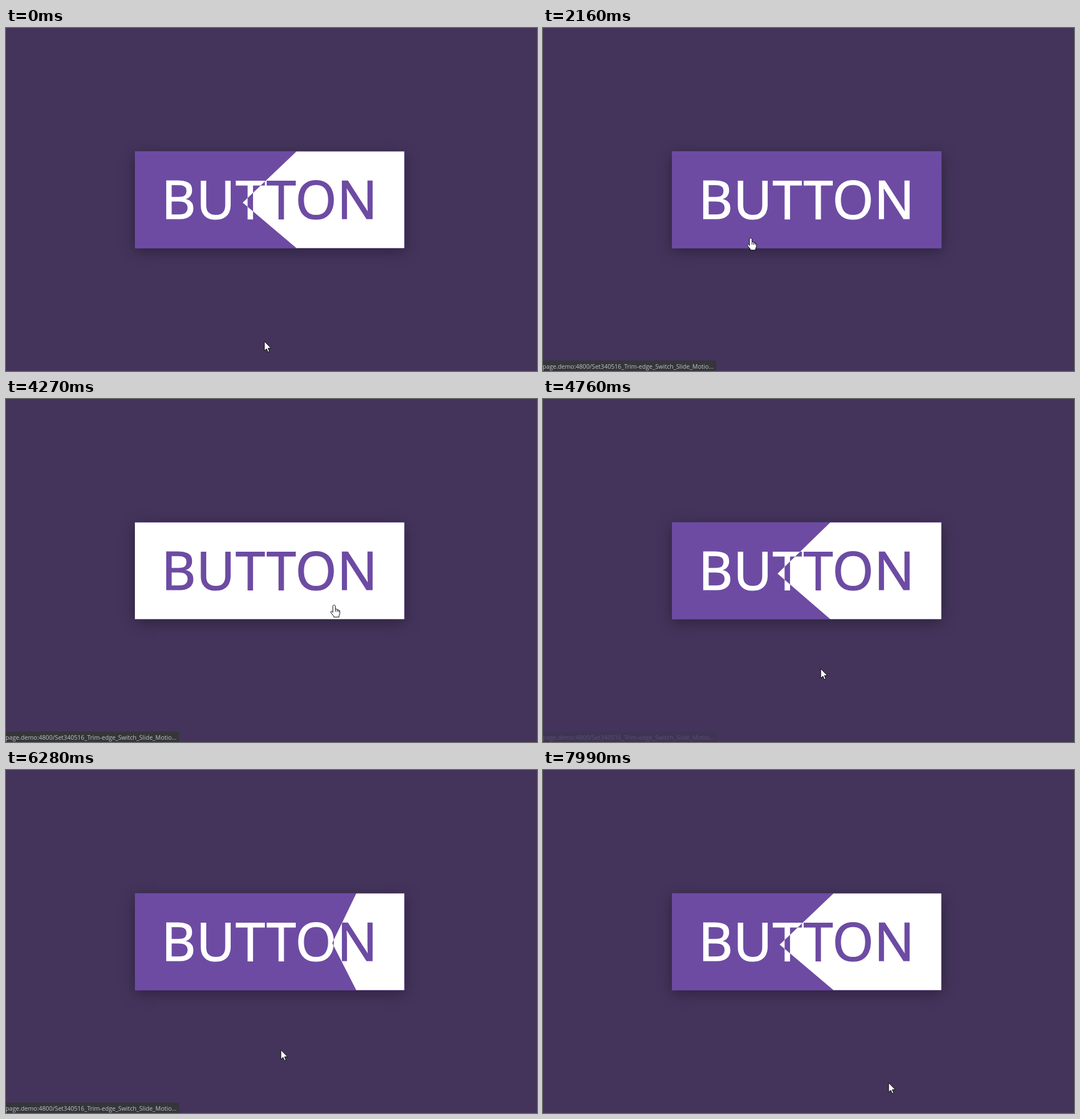
An HTML page with a canvas that plays this animation: 931 by 602 pixels, repeating every 8.37 s.

```html
<!DOCTYPE html>
<html lang="en">
<head>
<meta charset="utf-8">
<title>Button hover</title>
<style>
html, body { margin: 0; width: 100%; height: 100%; overflow: hidden; background: #44345c; }
canvas { display: block; }
</style>
</head>
<body>
<canvas id="stage" width="931" height="602"></canvas>
<script>
const ctx = document.getElementById('stage').getContext('2d');
const LOOP = 8370, FADE = 500;
const PURPLE = '#6d4ba3', WHITE = '#fff';
const box = { x: 226, y: 216.5, w: 472.5, h: 170 };
const midX = box.x + box.w / 2, bottom = box.y + box.h;

// Each move glides the pointer from where it rests to a new spot.
const moves = [
  { start: 550, end: 1844, x: 364, y: 368 },
  { start: 2160, end: 2930, x: 440, y: 510 },
  { start: 3190, end: 3480, x: 575.5, y: 361 },
  { start: 4270, end: 5090, x: 470, y: 495 },
  { start: 5140, end: 5493, x: 408.5, y: 376 },
  { start: 6140, end: 6300, x: 483, y: 493 },
  { start: 6300, end: 6675, x: 520, y: 505 },
  { start: 6675, end: 6935, x: 601.5, y: 278 },
  { start: 7450, end: 7600, x: 606, y: 549 },
];
const home = { x: 453, y: 550 };

const arrow = new Path2D('M0 0V16.5L3.8 13 6.3 18.8 8.8 17.7 6.4 12H11.7Z');
const hand = new Path2D('M-2.2 2Q0-1.6 2.2 2V7.5L3 7.2 5.3 7.6 6 8.6 8 8.8 8.7 9.8 10 10.6V15.5' +
  'L8.6 19V21.5H-.5V20L-5 14.5Q-7 11.5-5 11.2-3.8 11-2.2 13.4Z M2.3 8V12 M5.3 8.5V12.2 M8 9.5V12.5');

const clamp = v => Math.max(0, Math.min(1, v));
const mix = (a, b, k) => a + (b - a) * k;
const glide = p => 1 - (1 - p) ** 2;
const bezier = (a, b, s) => 3 * a * s * (1 - s) ** 2 + 3 * b * s * s * (1 - s) + s ** 3;

// cubic-bezier(.25, .1, .25, 1)
function ease(p) {
  let lo = 0, hi = 1;
  for (let i = 0; i < 24; i++) {
    const mid = (lo + hi) / 2;
    if (bezier(.25, .25, mid) < p) lo = mid; else hi = mid;
  }
  return bezier(.1, 1, lo);
}

// Sides: 1 hovers the left half, -1 the right half, 0 is outside.
const sideOf = ({ x, y }) => y > bottom ? 0 : x < midX ? 1 : -1;
const hovers = [{ time: -LOOP, from: 0, side: 0 }];
moves.forEach((move, i) => {
  const last = moves[i - 1] || home;
  const from = sideOf(last), side = sideOf(move);
  if (from === side) return;
  const k = (bottom - last.y) / (move.y - last.y);
  const time = mix(move.start, move.end, 1 - Math.sqrt(1 - k));
  hovers.push({ time, from, side });
});

function pointerAt(t) {
  const i = moves.findLastIndex(m => m.start <= t);
  if (i < 0) return home;
  const to = moves[i], from = moves[i - 1] || home;
  const k = glide(clamp((t - to.start) / (to.end - to.start)));
  return { x: mix(from.x, to.x, k), y: mix(from.y, to.y, k) };
}

function drawFace(fill, ink) {
  ctx.fillStyle = fill;
  ctx.fillRect(box.x, box.y, box.w, box.h);
  ctx.font = '93px "Noto Sans", "Open Sans", sans-serif';
  ctx.letterSpacing = '0.7px';
  ctx.textAlign = 'center';
  ctx.fillStyle = ctx.strokeStyle = ink;
  ctx.lineWidth = 1.2;
  ctx.fillText('BUTTON', midX, 334.5);
  ctx.strokeText('BUTTON', midX, 334.5);
}

function drawButton(v) {
  ctx.save();
  ctx.shadowColor = 'rgba(0,0,0,.35)';
  ctx.shadowBlur = 24;
  ctx.shadowOffsetY = 5;
  ctx.fillStyle = PURPLE;
  ctx.fillRect(box.x, box.y, box.w, box.h);
  ctx.restore();

  const k = Math.abs(v), end = v > 0 ? 1 : 0;
  const corner = mix(.6, end, k), tip = mix(.4, end, k), tipY = mix(.53, .5, k);
  ctx.save();
  drawFace(PURPLE, WHITE);
  ctx.beginPath();
  for (const [x, y] of [[corner, 0], [1, 0], [1, 1], [corner, 1], [tip, tipY]])
    ctx.lineTo(box.x + x * box.w, box.y + y * box.h);
  ctx.clip();
  drawFace(WHITE, PURPLE);
  ctx.restore();
}

function drawStatus(alpha) {
  ctx.save();
  ctx.globalAlpha = alpha;
  ctx.fillStyle = '#35363a';
  ctx.beginPath();
  ctx.roundRect(-5, 583.5, 309, 24, 3);
  ctx.fill();
  ctx.font = '10.6px "Open Sans", "Noto Sans", sans-serif';
  ctx.fillStyle = '#bdc1c6';
  ctx.fillText('page.demo:4800/Set340516_Trim-edge_Switch_Slide_Motio...', -1, 598);
  ctx.restore();
}

function drawPointer({ x, y }, shape) {
  ctx.save();
  ctx.translate(x, y);
  ctx.fillStyle = WHITE;
  ctx.strokeStyle = '#000';
  ctx.lineWidth = 1;
  ctx.fill(shape);
  ctx.stroke(shape);
  ctx.restore();
}

function draw(now) {
  const t = now % LOOP;
  const { time, from, side } = hovers.findLast(h => h.time <= t);
  const dt = t - time;

  ctx.fillStyle = '#44345c';
  ctx.fillRect(0, 0, 931, 602);
  drawButton(mix(from, side, ease(clamp(dt / FADE))));
  drawStatus(side ? clamp((dt - 200) / 120) : 1 - clamp((dt - 250) / 200));
  drawPointer(pointerAt(t), side ? hand : arrow);
  requestAnimationFrame(draw);
}
requestAnimationFrame(draw);
</script>
</body>
</html>
```
